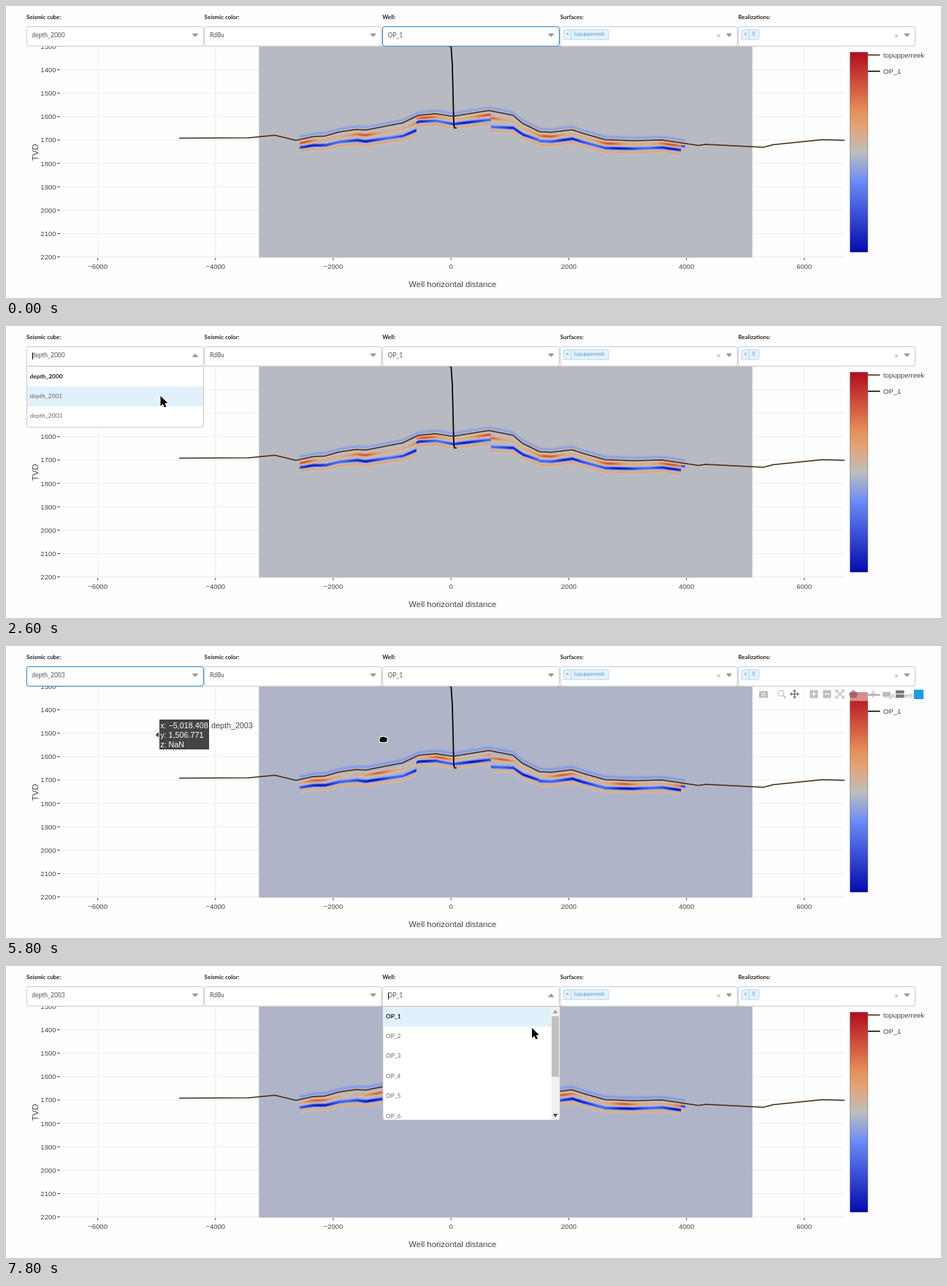
These frames come from a looping animation (1280 px wide and 401 px high, 8 s). An HTML page with a canvas:

```html
<!DOCTYPE html>
<html lang="en">
<head>
<meta charset="utf-8">
<title>Seismic intersection</title>
<style>
  html, body { margin: 0; width: 100%; height: 100%; overflow: hidden; background: #fefefe; }
  canvas { display: block; width: 100%; height: 100%; }
</style>
</head>
<body>
<canvas id="stage" width="1280" height="401"></canvas>
<script>
const ctx = document.getElementById('stage').getContext('2d');
const LOOP = 8000, STEP = 200;
const UI = 'Lato, sans-serif', PLOT = '"Liberation Sans", Arial, sans-serif';
const INK = '#444', BROWN = '#47280f', FOCUS = '#2779b0';

const px = x => 609.2 + x * 0.0806;
const py = y => 55.5 + (y - 1300) * 0.3212;

// Linear interpolation through rows of [position, ...values]
function sample(rows, at) {
  let i = 1;
  while (i < rows.length - 1 && rows[i][0] < at) i++;
  const a = rows[i - 1], b = rows[i];
  const k = Math.max(0, Math.min(1, (at - a[0]) / (b[0] - a[0])));
  return a.slice(1).map((v, n) => v + (b[n + 1] - v) * k);
}

const colorScale = [[0, 5, 10, 172], [.35, 106, 137, 247], [.5, 190, 190, 190],
  [.6, 220, 170, 132], [.7, 230, 145, 90], [1, 178, 10, 28]];
const scaleColor = v => `rgb(${sample(colorScale, .5 + v / 2)})`;

const surface = [[237, 181.5], [332, 181], [368, 177.5], [397, 184.5], [420, 179.5], [437, 178.5],
  [456, 173], [480, 169.5], [492, 170.5], [543, 160.5], [565, 150], [588, 148], [612, 151.5],
  [661, 143.5], [694, 150], [707, 161], [730, 172.5], [746, 173.5], [775, 170], [790, 175],
  [820, 183.5], [858, 185], [898, 184], [948, 191.5], [958, 190], [1037, 194], [1050, 190.5],
  [1118, 183.5], [1148, 184.5]];
const well = [[606, 55], [609.3, 56], [611, 80], [613, 163], [614, 167.5], [617, 167.5]];

// Fault blocks: left, right, depth of the blue reflector at both ends
const blocks = [[402, 562, 11, 19], [562, 664, 8.5, 13], [664, 730, 22, 12], [730, 924, 13, 10], [924, 930, 4, 4]];
const peak = (d, width) => Math.exp(-((d / width) ** 2));
const swell = (x, period, crest) => .5 + .5 * Math.cos((x - crest) / period * 2 * Math.PI);

// Amplitude of the wavelet stack at a depth d below the surface
function amplitude(x, d, blue, shift) {
  return -.15 * peak(d + 4, 2)
    + (.22 + .5 * swell(x, 84, 490 + shift) ** 2) * peak(d - blue * .45, 2.3)
    - (.5 + .45 * swell(x, 70, 420 + shift / 2)) * peak(d - blue, 2)
    + .25 * peak(d - blue - 5, 1.8);
}

function seismicImage(bias, shift) {
  const image = document.createElement('canvas');
  image.width = 1280;
  image.height = 401;
  const c = image.getContext('2d');
  c.fillStyle = scaleColor(bias);
  c.fillRect(346.2, 50, 675.6, 295.5);
  for (const [x0, x1, blue0, blue1] of blocks)
    for (let x = x0; x < x1; x++) {
      const blue = blue0 + (blue1 - blue0) * (x - x0) / (x1 - x0);
      const top = sample(surface, x)[0];
      for (let y = Math.floor(top) - 10; y < top + 33; y++) {
        c.fillStyle = scaleColor(bias + amplitude(x, y + .5 - top, blue, shift));
        c.fillRect(x, y, 1, 1);
      }
    }
  return image;
}
const cubes = { depth_2000: seismicImage(-.02, 0), depth_2003: seismicImage(-.054, 20) };

function rect(x, y, w, h, fill, stroke, radius = 0) {
  ctx.beginPath();
  ctx.roundRect(x, y, w, h, radius);
  if (fill) { ctx.fillStyle = fill; ctx.fill(); }
  if (stroke) { ctx.strokeStyle = stroke; ctx.lineWidth = 1; ctx.stroke(); }
}
function shape(points, fill, stroke) {
  ctx.beginPath();
  points.forEach(p => ctx.lineTo(...p));
  ctx.closePath();
  if (stroke) { ctx.strokeStyle = stroke; ctx.lineWidth = 1.4; ctx.stroke(); }
  ctx.fillStyle = fill;
  ctx.fill();
}
function polyline(points, color, width = 1) {
  ctx.beginPath();
  points.forEach(p => ctx.lineTo(...p));
  ctx.strokeStyle = color;
  ctx.lineWidth = width;
  ctx.stroke();
}
const line = (x0, y0, x1, y1, color, width) => polyline([[x0, y0], [x1, y1]], color, width);
function circle(x, y, r, fill, stroke) {
  rect(x - r, y - r, 2 * r, 2 * r, fill, stroke, r);
}
function text(value, x, y, font, color = INK, align = 'left') {
  ctx.font = font;
  ctx.fillStyle = color;
  ctx.textAlign = align;
  ctx.fillText(value, x, y);
}
function clipped(y, height, draw) {
  ctx.save();
  ctx.beginPath();
  ctx.rect(0, y, 1280, height);
  ctx.clip();
  draw();
  ctx.restore();
}

function drawPlot(cube) {
  const small = '9.5px ' + PLOT, title = '11.4px ' + PLOT;
  for (let v = -6000; v <= 6000; v += 2000) {
    line(px(v), 55, px(v), 345, '#ececf2');
    line(px(v), 346, px(v), 349, INK);
    text(String(v).replace('-', '−'), px(v), 361, small, INK, 'center');
  }
  for (let v = 1300; v <= 2200; v += 100) {
    line(76, py(v), 1148, py(v), '#ececf2');
    line(70, py(v), 74, py(v), INK);
    text(v, 68.5, py(v) + 3.5, small, INK, 'right');
  }
  ctx.drawImage(cubes[cube], 0, 0);
  polyline(surface, BROWN, 1.6);
  polyline(well, '#000', 1.7);
  text('Well horizontal distance', 611.3, 386, title, INK, 'center');
  ctx.save();
  ctx.translate(44, 201);
  ctx.rotate(-Math.PI / 2);
  text('TVD', 0, 0, title, INK, 'center');
  ctx.restore();

  const gradient = ctx.createLinearGradient(0, 338, 0, 63);
  colorScale.forEach(([stop, ...rgb]) => gradient.addColorStop(stop, `rgb(${rgb})`));
  rect(1155.5, 63.5, 24.3, 274.5, gradient, 'rgba(68,68,68,.4)');
  [['topupperreek', BROWN], ['OP_1', '#000']].forEach(([name, color], i) => {
    const y = 67.3 + i * 22.3;
    line(1180, y, 1196.5, y, color, 1.6);
    text(name, 1201, y + 3.5, small);
  });
}

function drawModebar() {
  const soft = '#bdbdbd', dark = '#777', y = 66;
  const plus = (x, r, color) => {
    line(x - r, y, x + r, y, color, 1.4);
    line(x, y - r, x, y + r, color, 1.4);
  };
  rect(1028, 57, 230, 18.5, 'rgba(255,255,255,.5)');
  rect(1031, y - 4, 12, 9, soft, null, 1);
  circle(1037, y + .5, 2.3, null, '#fff');
  circle(1061, y - 1, 4, null, soft);
  line(1064, y + 2, 1067.5, y + 5.5, soft, 2);
  plus(1079.5, 5.5, dark);
  for (const s of [-1, 1]) {
    shape([[1079.5 + s * 6.5, y], [1079.5 + s * 3.5, y - 2.5], [1079.5 + s * 3.5, y + 2.5]], dark);
    shape([[1079.5, y + s * 6.5], [1077, y + s * 3.5], [1082, y + s * 3.5]], dark);
  }
  for (const x of [1106, 1124]) rect(x - 5.5, y - 5.5, 11, 11, soft, null, 1);
  plus(1106, 3.5, '#fff');
  line(1120.5, y, 1127.5, y, '#fff', 1.4);
  for (const s of [-1, 1]) {
    line(1141.5 - 4, y - 4 * s, 1141.5 + 4, y + 4 * s, soft, 1.3);
    for (const u of [-1, 1])
      polyline([[1141.5 + 2 * u, y + 5.5 * s], [1141.5 + 5.5 * u, y + 5.5 * s], [1141.5 + 5.5 * u, y + 2 * s]], soft, 1.3);
  }
  shape([[1153.5, y], [1160, y - 6], [1166.5, y], [1164, y + 5], [1156, y + 5]], 'rgba(90,70,70,.5)');
  plus(1187, 5, soft);
  rect(1200, y - 3, 11, 6, soft);
  for (const top of [61, 66.7]) rect(1218, top, 11.5, 4.3, dark);
  rect(1243, 60, 13, 13, '#1f9be0');
}

function tooltip(x, y, lines, name, fill) {
  const font = '10.75px ' + PLOT, height = lines.length * 13.2 + 2.5;
  ctx.font = font;
  const width = Math.round(Math.max(...lines.map(s => ctx.measureText(s).width)) + 4);
  const left = Math.floor(x + 5) + .5, top = Math.round(y - height / 2) - .5;
  rect(left + width, top, ctx.measureText(name).width + 5, height, 'rgba(255,255,255,.76)');
  shape([[x, y], [left + 1, y - 5], [left + 1, y + 5]], fill);
  rect(left, top, width, height, fill, '#fff');
  lines.forEach((s, i) => text(s, left + 1.7, top + 12.2 + i * 13.2, font, '#fff'));
  text(name, left + width + 2.5, top + 12.2, font);
}
function cubeTooltip(x, y, name, z = 'NaN') {
  const format = v => v.toLocaleString('en-US', { maximumSignificantDigits: 7 }).replace('-', '−');
  // The box stays inside the plot area
  tooltip(px(x), Math.max(py(y), 77.5), ['x: ' + format(x), 'y: ' + format(y), 'z: ' + z], name, INK);
}

function drawTooltips(t, cube) {
  const between = (from, to) => t >= from && t < to;
  if (between(1000, 1400) || between(5000, 6000)) cubeTooltip(-5018.408, 1506.771, cube);
  if (between(1600, 1800)) clipped(0, 76, () => cubeTooltip(-4730.624, 1330.963, cube));
  if (between(1400, 1800)) clipped(t < 1600 ? 0 : 76, 300, () => cubeTooltip(-4866.205, 1372.919, cube));
  if (between(6400, 6800)) cubeTooltip(200.0699, 1413.874, cube, 0);
  if (between(6600, 6800)) tooltip(616.7, 167.8, ['(93.23416, 1,648.511)'], 'OP_1', '#000');
}

function triangle(x, y, up, color = '#999', r = 4.5) {
  const s = up ? -2.5 : 2.5;
  shape([[x - r, y - s], [x + r, y - s], [x, y + s]], color);
}

function select(column, label, { value, tag, focus, open }) {
  const x = 28 + column * 243.6;
  text(label, x, 18.3, 'bold 7.9px ' + UI, '#222');
  rect(x + .3, 28.3, 242, 26.9, '#fff', focus ? FOCUS : '#c8c8cc', open ? [3, 3, 0, 0] : 3);
  triangle(x + 231, 40.3, open);
  if (value) text(value, x + 7.3, 43, '8.5px ' + UI, '#555');
  if (open) line(x + 8.5, 36.5, x + 8.5, 46, '#000');
  if (tag) {
    const font = '7px ' + UI, blue = '#4a97d6', border = '#b5d8f3';
    ctx.font = font;
    rect(x + 4.5, 32.5, ctx.measureText(tag).width + 20, 13.5, '#e6f2fc', border, 2);
    line(x + 15, 33, x + 15, 46, border);
    text('×', x + 9.8, 41.3, font, blue, 'center');
    text(tag, x + 19, 41.3, font, blue);
    text('×', x + 216.5, 43.5, '10px ' + UI, '#999', 'center');
  }
}

function menu(x, height, options, active) {
  rect(x + .5, 55.5, 242, height, '#fff', '#c8c8cc', [0, 0, 3, 3]);
  clipped(55, height, () => options.forEach((option, i) => {
    const y = 56 + i * 27.4;
    if (i === active) rect(x + 1, y, 241, 27.2, '#e2f0fb');
    text(option, x + 4.5, y + 15.5, (i ? '' : 'bold ') + '8.4px ' + UI, i ? '#666' : '#222');
  }));
}

function drawHeader(t, cube) {
  const cubeOpen = t >= 2000 && t < 3400, wellOpen = t >= 7200;
  rect(0, 0, 1280, 55, '#fefefe');
  select(0, 'Seismic cube:', { value: cube, open: cubeOpen, focus: t >= 3400 && !wellOpen });
  select(1, 'Seismic color:', { value: 'RdBu' });
  select(2, 'Well:', { value: 'OP_1', open: wellOpen, focus: t < 2000 });
  select(3, 'Surfaces:', { tag: 'topupperreek' });
  select(4, 'Realizations:', { tag: '0' });
  const hovered = Math.max(0, Math.floor((pointerAt(t)[1] - 55) / 27.4));
  if (cubeOpen) menu(28, 83.5, ['depth_2000', 'depth_2001', 'depth_2003'], hovered);
  if (wellOpen) {
    menu(515.5, 156, [1, 2, 3, 4, 5, 6].map(n => 'OP_' + n), 0);
    rect(746.5, 56, 11, 155, '#f1f1f1');
    rect(747, 69, 10, 83, '#c1c1c1');
    triangle(752, 62.5, true, '#a3a3a3', 3.5);
    triangle(752, 205.5, false, '#505050', 3.5);
  }
}

const pointerPath = [[1000, 206, 121], [1600, 235.5, 63], [2000, 240, 44], [2600, 211.5, 96],
  [3200, 201.5, 123], [5400, 201.5, 126], [5800, 516.5, 128], [6600, 699, 62.5],
  [6800, 712, 41], [7200, 718, 44], [7800, 720, 85]];
const pointerAt = t => sample(pointerPath, t);

function hand() {
  for (const [color, grow] of [['#fff', 1], ['#000', 0]]) {
    rect(-5 - grow, -1.5 - grow, 10 + 2 * grow, 5.5 + 2 * grow, color, null, 2);
    for (let i = 0; i < 4; i++) circle(-2.7 + i * 2.1, -2 + Math.abs(i - 1) * .6, 1.6 + grow, color);
  }
}
function arrow(size) {
  const outline = [[0, 0], [0, 14], [3.2, 11], [5.5, 15.7], [7.8, 14.6], [5.7, 10], [9.8, 9.8]];
  shape(outline.map(p => p.map(v => v * size)), '#000', '#fff');
}
function spinner(t) {
  const angle = t / STEP * 0.8;
  const ball = ctx.createRadialGradient(6 + Math.cos(angle), 6 + Math.sin(angle), 0.5, 6, 8, 6);
  ['#ddd', '#777', '#222'].forEach((color, i) => ball.addColorStop(i / 2, color));
  circle(6, 8, 5.5, ball);
}

function drawPointer(t) {
  if (t < 1000) return;
  const busy = t >= 3400 && t < 5000;
  const overPlot = t < 1800 || (t >= 5000 && t < 6800);
  ctx.save();
  ctx.translate(...pointerAt(t));
  if (overPlot) hand();
  else arrow(busy ? 0.7 : 1);
  if (busy) spinner(t);
  ctx.restore();
}

function draw(now) {
  const t = Math.floor(now % LOOP / STEP) * STEP;
  const plotted = t < 5000 ? 'depth_2000' : 'depth_2003';
  const selected = t < 3400 ? 'depth_2000' : 'depth_2003';
  rect(0, 0, 1280, 401, '#fefefe');
  drawPlot(plotted);
  if ((t >= 1000 && t < 2200) || (t >= 5000 && t < 7200)) drawModebar();
  drawTooltips(t, plotted);
  drawHeader(t, selected);
  drawPointer(t);
  requestAnimationFrame(draw);
}
requestAnimationFrame(draw);
</script>
</body>
</html>
```
